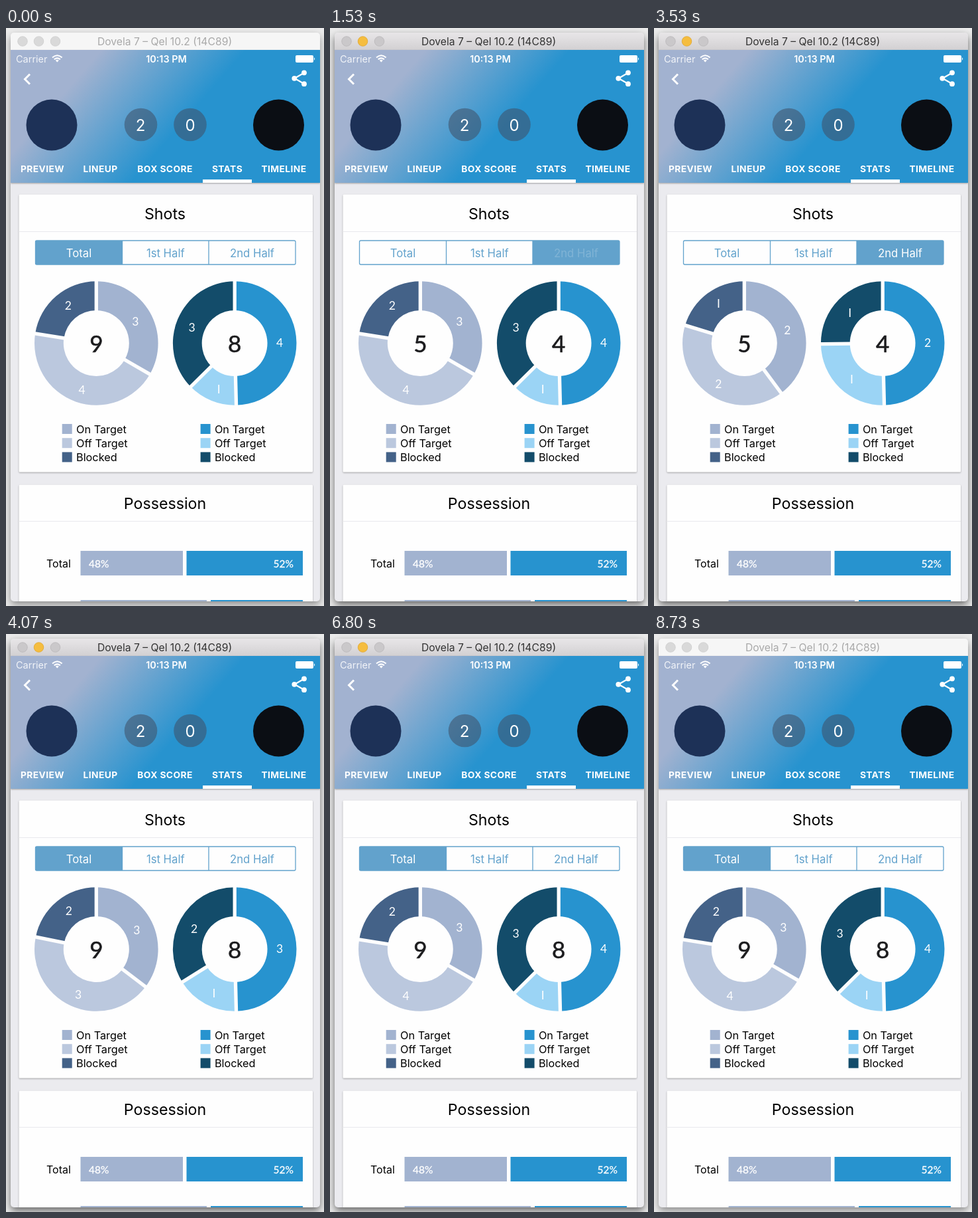
These frames come from a looping animation (480 by 870 pixels, 8790 ms). An HTML page:

```html
<!DOCTYPE html>
<html lang="en">
<head>
<meta charset="utf-8">
<title>Match stats</title>
<style>
  html, body { margin: 0; width: 100%; height: 100%; overflow: hidden; background: #ebebeb; }
  svg { display: block; }
  text { font-family: Inter, Roboto, sans-serif; }
  .mid { text-anchor: middle; }
  .num { font-family: Lato, "Open Sans", sans-serif; }
  .tabs text { font-size: 13.8px; font-weight: 700; letter-spacing: .4px; fill: #fff; }
  .shade { filter: drop-shadow(0 1px 1.2px rgba(0, 0, 0, .32)); }
</style>
</head>
<body>
<svg width="480" height="870" viewBox="0 0 480 870">
  <defs>
    <linearGradient id="sky" gradientUnits="userSpaceOnUse" x1="98" y1="86" x2="222" y2="194">
      <stop offset="0" stop-color="#a2b2d0"/>
      <stop offset="1" stop-color="#2793cf"/>
    </linearGradient>
    <linearGradient id="chrome" x2="0" y2="1">
      <stop offset="0" stop-color="#e8e6e8"/>
      <stop offset="1" stop-color="#d2d0d2"/>
    </linearGradient>
    <filter id="blur" x="-10%" y="-10%" width="120%" height="120%"><feGaussianBlur stdDeviation="6"/></filter>
    <clipPath id="win"><rect x="7" y="7" width="467" height="856" rx="5"/></clipPath>
  </defs>

  <rect id="shadow" x="7" y="12" width="467" height="856" rx="6" filter="url(#blur)"/>

  <g clip-path="url(#win)">
    <rect x="7" y="7" width="467" height="856" fill="#ebebef"/>

    <!-- window bar -->
    <rect id="bar" x="7" y="7" width="467" height="26"/>
    <g id="lights" stroke-width=".8">
      <circle cx="25" cy="20" r="7.3"/>
      <circle cx="49.5" cy="20" r="7.3"/>
      <circle cx="74.5" cy="20" r="7.3"/>
    </g>
    <text id="caption" class="mid" x="239.5" y="26" font-size="15.7">Dovela 7 – Qel 10.2 (14C89)</text>

    <!-- app header -->
    <g class="shade"><rect x="7" y="33" width="467" height="200" fill="url(#sky)"/></g>
    <text x="15" y="52" font-size="14.5" fill="#fff" opacity=".85">Carrier</text>
    <g fill="none" stroke="#fff" stroke-width="2.1">
      <path d="M70 44.5q7.3-6.5 14.6 0M72.7 47.3q4.6-4 9.2 0"/>
      <path d="M74.8 48.8q2.5-2 5 0L77.3 51.5z" fill="#fff" stroke="none"/>
      <path d="M36 69.5L28.5 77L36 84.5" stroke-width="3"/>
      <path d="M450 67.5L435.5 75.8L450 84" stroke-width="2.2"/>
    </g>
    <g fill="#fff">
      <circle cx="450" cy="67.3" r="3.9"/>
      <circle cx="435.3" cy="75.8" r="3.9"/>
      <circle cx="450" cy="84.2" r="3.9"/>
      <rect x="437" y="41" width="27" height="11" rx="2"/>
      <path d="M465 44.3q2.4 2.2 0 4.4z"/>
    </g>
    <text class="mid" x="242" y="51.5" font-size="14.4" font-weight="600" fill="#fff">10:13 PM</text>
    <circle cx="69" cy="146" r="38.5" fill="#1d3157"/>
    <circle cx="411.5" cy="146" r="38.5" fill="#0b0e14"/>
    <g fill="#3f5068" fill-opacity=".56">
      <circle cx="203.5" cy="145.5" r="24.8"/>
      <circle cx="278" cy="145.5" r="24.8"/>
    </g>
    <g class="mid" font-size="24" fill="#fff">
      <text x="203" y="154.5">2</text>
      <text x="278" y="154.5">0</text>
    </g>
    <g class="tabs mid">
      <text x="55" y="217">PREVIEW</text>
      <text x="142.5" y="217">LINEUP</text>
      <text x="240" y="217">BOX SCORE</text>
      <text x="334" y="217">STATS</text>
      <text x="419.5" y="217">TIMELINE</text>
    </g>
    <rect x="297" y="228" width="74" height="5" fill="#fff"/>

    <!-- cards -->
    <g class="shade" fill="#fefefe">
      <rect x="19.5" y="250.5" width="443.5" height="418" rx="1.5"/>
      <rect x="19.5" y="687.5" width="443.5" height="190" rx="1.5"/>
    </g>
    <path d="M19.5 306.5h443.5M19.5 742.5h443.5" stroke="#e9e9ed"/>
    <g class="mid" font-size="23.2">
      <text x="240" y="288">Shots</text>
      <text x="240" y="724">Possession</text>
    </g>

    <g id="segs"></g>
    <path d="M175.5 320V356M306 320V356" stroke="#62a2cc" stroke-width="1.3"/>
    <rect x="44.5" y="320" width="392.5" height="36" rx="2" fill="none" stroke="#62a2cc" stroke-width="1.3"/>

    <g id="charts"></g>

    <!-- possession bars -->
    <text x="61" y="811.5" font-size="16">Total</text>
    <g fill="#a2b3d0">
      <rect x="112.5" y="787" width="154.5" height="37"/>
      <rect x="112.5" y="861" width="190.5" height="4"/>
    </g>
    <g fill="#2793cf">
      <rect x="272.5" y="787" width="175.5" height="37"/>
      <rect x="309" y="861" width="139" height="4"/>
    </g>
    <g fill="#fff" stroke="#fff" stroke-width=".3" font-size="15.5">
      <text class="num" x="125" y="811.5">48%</text>
      <text class="num" x="434" y="811.5" text-anchor="end">52%</text>
    </g>
  </g>
</svg>

<script>
const LOOP = 8790, FADE = 220, MORPH = 600, PAD = 0.05;
const OUTER = 93.3, INNER = 49.5, MID = 71;
const TIMES = { focus: 1400, blur: 6930, tapHalf: 1490, morphHalf: 1540, tapTotal: 3730, morphTotal: 3760 };
const BLUE = '#62a2cc', INK = '#1c1c1e';
const $ = id => document.getElementById(id);
const clamp = x => Math.max(0, Math.min(1, x));
const ease = x => x < .5 ? 4 * x ** 3 : 1 - 4 * (1 - x) ** 3;

function add(parent, tag, attrs, label) {
  const el = document.createElementNS('http://www.w3.org/2000/svg', tag);
  set(el, attrs);
  if (label) el.textContent = label;
  return parent.appendChild(el);
}
function set(el, attrs) {
  for (const k in attrs) el.setAttribute(k, attrs[k]);
}

const segs = [['Total', 44.5, 131], ['1st Half', 175.5, 130.5], ['2nd Half', 306, 131]].map(([name, x, width]) => ({
  box: add($('segs'), 'rect', { x, y: 320, width, height: 36, fill: BLUE }),
  label: add($('segs'), 'text', { x: x + width / 2, y: 344.5, class: 'mid', 'font-size': 16.7 }, name)
}));

// nudge: label offset from each slice's centroid
const charts = [
  { cx: 136.3, total: [3, 4, 2], half: [2, 2, 1], colors: ['#a2b3d0', '#bbc8de', '#446288'],
    nudge: [[-2.5, 3], [2, 3.5], [3.5, -2.5]] },
  { cx: 345.2, total: [4, 1, 3], half: [2, 1, 1], colors: ['#2793cf', '#9bd4f5', '#134c6a'],
    nudge: [[-3, 0], [2.5, 3.7], [1, 4]] }
];
for (const c of charts) {
  const g = $('charts');
  const ring = add(g, 'g', { transform: `translate(${c.cx} 474.5)` });
  c.slices = c.colors.map(fill => add(ring, 'path', { fill }));
  c.gaps = add(ring, 'path', { stroke: '#fefefe', 'stroke-width': 5.3 });
  c.labels = c.colors.map(() => add(ring, 'text', { class: 'mid num', fill: '#fff', 'font-size': 17.5 }));
  c.sum = add(ring, 'text', { class: 'mid num', y: 13, fill: INK, stroke: INK, 'stroke-width': .6, 'font-size': 35 });
  ['On Target', 'Off Target', 'Blocked'].forEach((name, i) => {
    const x = c.cx - 51.6, y = 596 + 21.2 * i;
    add(g, 'rect', { x, y, width: 15, height: 15, fill: c.colors[i] });
    add(g, 'text', { x: x + 21.3, y: y + 13.7, 'font-size': 16.3 }, name);
  });
}

const polar = (r, a) => [r * Math.sin(a), -r * Math.cos(a)];
const point = (r, a) => polar(r, a).map(v => v.toFixed(2)).join(' ');

function drawChart(c, mix, half) {
  const vals = c.total.map((v, i) => v + (c.half[i] - v) * mix);
  const k = (2 * Math.PI - 3 * PAD) / vals.reduce((s, v) => s + v);
  let a = 0, gaps = '';
  vals.forEach((v, i) => {
    const b = a + v * k + PAD, big = b - a > Math.PI ? 1 : 0;
    set(c.slices[i], { d: `M${point(OUTER, a)}A${OUTER} ${OUTER} 0 ${big} 1 ${point(OUTER, b)}` +
      `L${point(INNER, b)}A${INNER} ${INNER} 0 ${big} 0 ${point(INNER, a)}Z` });
    gaps += `M${point(INNER - 2, a)}L${point(OUTER + 2, a)}`;
    const [x, y] = polar(MID, (a + b) / 2), [dx, dy] = c.nudge[i];
    set(c.labels[i], { x: x + dx, y: y + dy + 6 });
    // numeral one is a plain bar in this style
    c.labels[i].textContent = String(Math.round(v)).replace('1', 'I');
    a = b;
  });
  set(c.gaps, { d: gaps });
  c.sum.textContent = (half ? c.half : c.total).reduce((s, v) => s + v);
}

function drawWindow(active) {
  set($('shadow'), { opacity: active ? .56 : .4 });
  set($('bar'), { fill: active ? 'url(#chrome)' : '#f6f6f6' });
  set($('caption'), { fill: active ? '#333' : '#a9a9a9' });
  [...$('lights').children].forEach((dot, i) => {
    const lit = active && i === 1;
    set(dot, { fill: lit ? '#f5bd3f' : active ? '#cac8ca' : '#d9d9d9', stroke: lit ? '#dfa52f' : active ? '#b9b7b9' : '#cdcdcd' });
  });
}

function draw(t) {
  const half = t >= TIMES.tapHalf && t < TIMES.tapTotal;
  const chosen = half ? 2 : 0;
  const since = t < TIMES.tapHalf ? FADE : t - (half ? TIMES.tapHalf : TIMES.tapTotal);
  segs.forEach((s, i) => {
    const on = i === chosen;
    set(s.box, { visibility: on ? 'visible' : 'hidden' });
    set(s.label, { fill: on ? '#fff' : BLUE, opacity: on ? clamp(since / FADE) : 1 });
  });
  const mix = ease(clamp((t - TIMES.morphHalf) / MORPH)) - ease(clamp((t - TIMES.morphTotal) / MORPH));
  charts.forEach(c => drawChart(c, mix, half));
  drawWindow(t >= TIMES.focus && t < TIMES.blur);
}

const start = performance.now();
function tick() {
  draw((performance.now() - start) % LOOP);
  requestAnimationFrame(tick);
}
tick();
</script>
</body>
</html>
```
